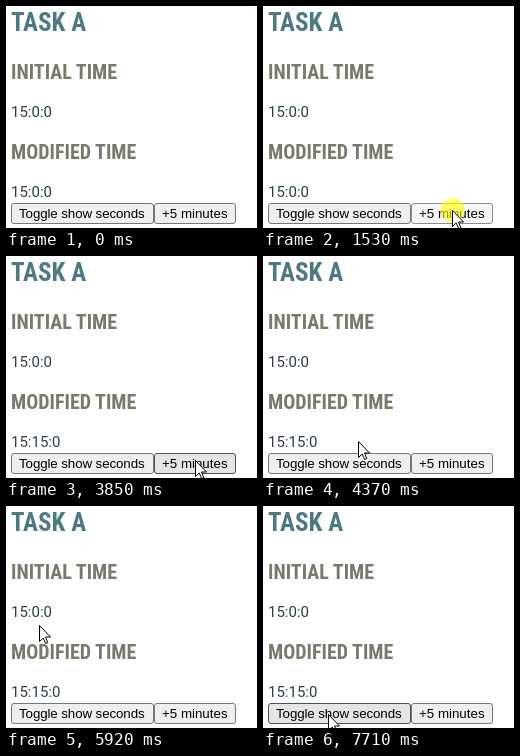
An HTML page for the animation above (8 s loop, 251 by 222 pixels).

```html
<!DOCTYPE html>
<html lang="en">
<head>
<meta charset="utf-8">
<title>Task A</title>
<style>
  html, body { margin: 0; width: 100%; height: 100%; overflow: hidden; background: #fff; }
  svg { display: block; width: 100%; height: 100%; }
  .title, .heading { font-family: "Roboto Condensed", Roboto, sans-serif; font-weight: 700; font-stretch: 75%; }
  .title { font-size: 25px; fill: #4d7a82; }
  .heading { font-size: 20px; fill: #7a7a6c; }
  .time { font: 15px Roboto, sans-serif; fill: #2c3e46; }
  .button text { font: 13.333px "Liberation Sans", Arial, sans-serif; fill: #000; }
  .button rect { fill: #efefef; stroke: #767676; }
  .button.hover rect { fill: #e5e5e5; stroke: #4f4f4f; }
  .button.active rect { fill: #f5f5f5; stroke: #8d8d8d; }
</style>
</head>
<body>
<svg viewBox="0 0 251 222">
  <text class="title" x="5" y="25">TASK A</text>
  <text class="heading" x="5" y="73">INITIAL TIME</text>
  <text class="time" x="5" y="111">15:0:0</text>
  <text class="heading" x="5" y="153">MODIFIED TIME</text>
  <text class="time" id="modified" x="5" y="191">15:0:0</text>
  <g class="button" id="toggle">
    <rect x="5.5" y="197.5" width="142" height="20" rx="2.5"/>
    <text x="13" y="212" letter-spacing="-.1">Toggle show seconds</text>
  </g>
  <g class="button" id="add">
    <rect x="148.5" y="197.5" width="81" height="20" rx="2.5"/>
    <text x="156" y="212">+5 minutes</text>
  </g>
  <circle id="click" cx="189.5" cy="204" r="12" fill="#ffff00" fill-opacity=".6"/>
  <path id="arrow" d="M.5 .5V16.5L4.2 13L6.7 18.5L8.8 17.6L6.5 12H11.5Z" fill="#fff" stroke="#000"/>
  <path id="beam" d="M0 .5H3M4 .5H7M3.5 1V15M0 15.5H3M4 15.5H7" fill="none" stroke="#000"/>
</svg>
<script>
  const LOOP = 8000;
  const $ = id => document.getElementById(id);

  // [start ms, x, y, shape]
  const pointer = [
    [0, 0, 0, "none"],
    [480, 224, 220, "arrow"],
    [750, 180, 207, "arrow"],
    [1020, 189, 204, "arrow"],
    [4100, 188, 203, "arrow"],
    [4370, 95, 185, "arrow"],
    [4620, 43, 171, "beam"],
    [4890, 26, 173, "arrow"],
    [5160, 36, 179, "beam"],
    [5410, 25, 167, "arrow"],
    [5660, 38, 167, "arrow"],
    [5920, 33, 119, "arrow"],
    [6170, 38, 119, "arrow"],
    [6420, 29, 82, "arrow"],
    [6670, 23, 122, "arrow"],
    [6930, 26, 95, "arrow"],
    [7200, 44, 197, "arrow"],
    [7460, 51, 214, "arrow"],
    [7710, 65, 208, "arrow"]
  ];
  const minutes = [[0, 0], [1790, 5], [2820, 10], [3850, 15]];
  const addState = [[0, ""], [750, "hover"], [1530, "active"], [1790, "hover"], [4370, ""]];
  const toggleState = [[0, ""], [7200, "hover"]];

  const at = (steps, t) => steps.findLast(step => step[0] <= t);
  const setState = (id, state) => $(id).setAttribute("class", "button " + state);

  function draw(t) {
    const [, x, y, shape] = at(pointer, t);
    for (const id of ["arrow", "beam"]) {
      $(id).setAttribute("transform", `translate(${x} ${y})`);
      $(id).style.display = id === shape ? "" : "none";
    }
    const state = at(addState, t)[1];
    setState("add", state);
    setState("toggle", at(toggleState, t)[1]);
    $("click").style.display = state === "active" ? "" : "none";
    $("modified").textContent = `15:${at(minutes, t)[1]}:0`;
  }

  const start = performance.now();
  function tick() {
    draw((performance.now() - start) % LOOP);
    requestAnimationFrame(tick);
  }
  tick();
</script>
</body>
</html>
```
